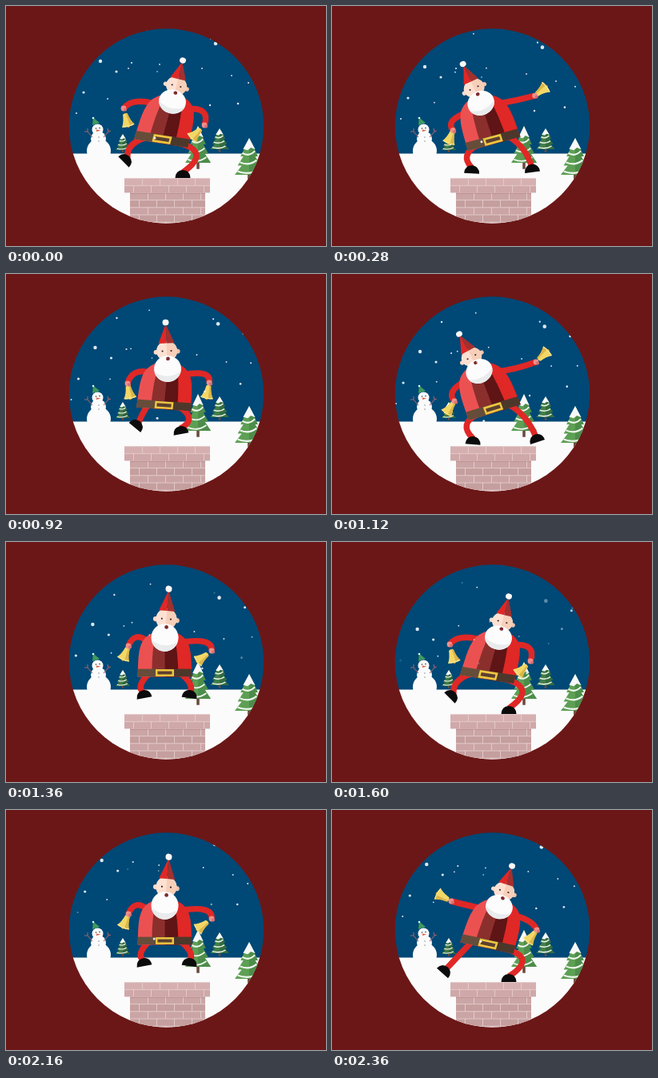
These frames come from a looping animation (400x300 px, 2.4 s). An HTML page with a canvas:

```html
<!DOCTYPE html>
<html lang="en">
<head>
<meta charset="utf-8">
<title>Dancing Santa</title>
<style>
html, body { margin: 0; width: 100%; height: 100%; overflow: hidden; background: #6b1717; }
canvas { display: block; }
</style>
</head>
<body>
<canvas id="stage" width="400" height="300"></canvas>
<script>
const ctx = document.getElementById('stage').getContext('2d');
const LOOP = 2400, STEP = 40, BEAT = 800, AXIS = 399;
const RED = '#e02826', LIGHT_RED = '#ec5152', DULL_RED = '#a3302f', PINK = '#ee8f8c';

// Arms: elbow, hand, bell. Legs: knee, sole. Tilts: body, left foot, right foot.
const settle = {
  buckle: [195, 166.5], beard: [208, 119.5], pom: [221, 68], tilts: [9, 45, 0],
  armL: [158, 114, 147, 128, 151, 143], armR: [256, 126, 248, 149, 237, 160],
  legL: [150, 172, 147, 195], legR: [258, 182, 221, 215]
};
const rise = {
  buckle: [197.5, 164], beard: [202, 118.5], pom: [199.5, 60.5], tilts: [4, 40, -10],
  armL: [157, 117, 152, 137, 154, 148], armR: [257, 119, 254, 136, 252, 148],
  legL: [169, 177, 161, 192], legR: [240, 182, 219, 200]
};
const tuck = {
  buckle: [198.5, 163.5], beard: [198.5, 119.5], pom: [203.5, 58.7], tilts: [0, -10, 8],
  armL: [161, 110, 153, 130, 149, 140], armR: [259, 119, 257, 136, 245, 145],
  legL: [162, 181, 173, 195], legR: [236, 179, 229, 195]
};
const land = {
  buckle: [201.5, 168], beard: [184, 121.5], pom: [159, 75], tilts: [-17, 5, -18],
  armL: [142, 147, 153, 159, 147, 168], armR: [228, 120, 255, 110, 264.5, 101],
  legL: [157, 187, 176, 213], legR: [243, 175, 257, 210]
};
const fling = {
  buckle: [195, 167.5], beard: [209, 121], pom: [225, 70], tilts: [12, 42, 0],
  armL: [172, 120, 149, 114, 138, 108], armR: [252, 138, 256, 150, 249, 159],
  legL: [162, 178, 138, 204], legR: [258, 184, 221, 215]
};

function mirror(p) {
  const flip = a => a.map((v, i) => i % 2 ? v : AXIS - v);
  const [body, left, right] = p.tilts;
  return {
    buckle: flip(p.buckle), beard: flip(p.beard), pom: flip(p.pom),
    tilts: [-body, -right, -left],
    armL: flip(p.armR), armR: flip(p.armL), legL: flip(p.legR), legR: flip(p.legL)
  };
}

const half = [[0, settle], [120, rise], [160, mirror(tuck)], [320, land], [360, mirror(fling)]];
const keys = half.concat(half.map(([t, p]) => [t + BEAT / 2, mirror(p)]));

function keyAt(i) {
  const n = keys.length, turn = Math.floor(i / n), [t, p] = keys[i - turn * n];
  return [t + turn * BEAT, p];
}

// Monotone cubic through four neighbouring keys.
function blend(v, t, now) {
  const slope = i => (v[i + 1] - v[i]) / (t[i + 1] - t[i]);
  const tangent = (a, b) => a * b > 0 ? 2 * a * b / (a + b) : 0;
  const h = t[2] - t[1], u = (now - t[1]) / h;
  const m1 = tangent(slope(0), slope(1)) * h, m2 = tangent(slope(1), slope(2)) * h;
  const s = u * u * (3 - 2 * u);
  return v[1] * (1 - s) + v[2] * s + m1 * u * (1 - u) * (1 - u) - m2 * u * u * (1 - u);
}

function poseAt(time) {
  const now = time % BEAT;
  let i = keys.length - 1;
  while (keys[i][0] > now) i--;
  const near = [i - 1, i, i + 1, i + 2].map(keyAt), times = near.map(k => k[0]);
  const pose = {};
  for (const part in settle) {
    pose[part] = settle[part].map((_, j) => blend(near.map(k => k[1][part][j]), times, now));
  }
  return pose;
}

function dot(x, y, r, color) {
  ctx.fillStyle = color;
  ctx.beginPath();
  ctx.arc(x, y, r, 0, 7);
  ctx.fill();
}

function rect(x, y, w, h, color) {
  ctx.fillStyle = color;
  ctx.fillRect(x, y, w, h);
}

function poly(color, ...pts) {
  ctx.fillStyle = color;
  ctx.beginPath();
  pts.forEach(([x, y]) => ctx.lineTo(x, y));
  ctx.fill();
}

function shape(color, path) {
  ctx.fillStyle = color;
  ctx.fill(new Path2D(path));
}

function line(color, width, path) {
  ctx.strokeStyle = color;
  ctx.lineWidth = width;
  ctx.stroke(new Path2D(path));
}

function within(matrix, draw) {
  ctx.save();
  ctx.transform(...matrix);
  draw();
  ctx.restore();
}

function spin(x, y, angle, draw) {
  const c = Math.cos(angle), s = Math.sin(angle);
  within([c, s, -s, c, x, y], draw);
}

function tree(x, top, base, width, green, shade) {
  const h = base - top, r = width / 2;
  rect(x - r * .11, base - 1, r * .22, h * .19, '#6b4a3c');
  for (let i = 2; i >= 0; i--) {
    const y0 = top + h * i * .24, y1 = top + h * (.5 + i * .25), w = r * (.6 + i * .2);
    poly(green, [x, y0], [x + w, y1], [x - w, y1]);
    poly(shade, [x, y0], [x + w, y1], [x, y1]);
    line('#eef5ee', Math.max(1, width / 17),
      `M${x - w * .8} ${y1 - h * .09}Q${x} ${y1 + h * .02} ${x + w * .65} ${y1 - h * .15}`);
  }
  poly('#f7f9f9', [x, top], [x + r * .42, top + h * .31], [x + r * .12, top + h * .26],
    [x - r * .1, top + h * .33], [x - r * .42, top + h * .3]);
}

function snowman() {
  dot(116, 181, 15, '#fbfbfc');
  dot(115.5, 166, 9.5, '#fbfbfc');
  dot(114.5, 154.5, 7, '#fbfbfc');
  poly('#3f9a5b', [108, 149], [117, 146], [109, 139.5]);
  dot(109, 140, 1.3, '#e8f2ea');
  line('#9a6470', 1.1, 'M108 164L102 157M102 157L98 157M102 157L102 153M122 164L128 157M128 157L131 156M128 157L127 153');
  dot(112.5, 153, .8, '#333');
  dot(117, 152.5, .8, '#333');
  poly('#e2603a', [113, 154.5], [118.5, 155.5], [113, 157]);
  for (const y of [164, 169]) dot(116, y, .8, '#8b8f98');
}

function bricks(x, y, w, rows, color) {
  const brick = 22, tall = 9.2;
  rect(x, y, w, rows * tall, color);
  for (let r = 0; r < rows; r++) {
    const top = y + r * tall;
    if (r % 2) rect(x, top, w, tall, 'rgba(150,95,95,.1)');
    for (let bx = x + (r % 2 ? brick / 2 : brick); bx < x + w; bx += brick) rect(bx, top, .9, tall, '#e6cdcd');
    rect(x, top, w, .9, '#e6cdcd');
  }
}

function scenery() {
  rect(75, 24, 250, 162, '#004876');
  rect(75, 184.5, 250, 90, '#fbfbfc');
  snowman();
  tree(146, 160, 180, 18, '#437b48', '#34673e');
  tree(267, 153, 179, 23, '#437f49', '#346c3e');
  tree(240, 150, 196, 32, '#5d9f54', '#4d8d4a');
  tree(304, 165, 211, 36, '#5d9f54', '#4d8d4a');
  bricks(155, 233, 94, 5, '#cba5a5');
  rect(155, 233, 94, 2, 'rgba(120,70,72,.18)');
  bricks(148, 215, 107, 2, '#d6b0b1');
}

// Start x, start y, radius.
const flakes = [
  [118, 69, 2.2], [262, 47, 2.3], [157, 71, 1.1], [153, 78, .9], [138, 82, 1.6], [192, 73, .9],
  [145, 32, 1.2], [256, 41, 1.1], [189, 82, .8], [294, 59, 1.5], [97, 108, 1.6], [290, 122, 1.3],
  [255, 124, 1.2], [176, 30, .9], [282, 87, .9], [303, 96, 1], [88, 134, 1], [127, 116, .9],
  [245, 78, .9], [186, 165, 1.5]
];

// Each flake drifts for one loop and fades while it returns to its start.
function snow(time) {
  flakes.forEach(([x, y, r], i) => {
    const born = .12 + (i * .37 + .1) % .3, life = (time / LOOP + born) % 1, move = life - born;
    const [drift, fall] = i % 2 ? [8, 40] : [-17, 60];
    ctx.globalAlpha = .92 * Math.min(1, life * 10, (1 - life) * 10);
    dot(x + move * drift, y + move * fall, r, '#eef6fa');
  });
  ctx.globalAlpha = 1;
}

function limb(start, cx, cy, x, y) {
  line(RED, 7.5, `M${start}Q${cx} ${cy} ${x} ${y}`);
}

function bell([, , hx, hy, bx, by]) {
  spin(bx, by, Math.atan2(by - hy, bx - hx) - Math.PI / 2, () => {
    dot(0, 7.5, 1.8, '#c99427');
    shape('#f3d766', 'M-3 -8Q0 -10.5 3 -8Q4 1 8 7Q0 9 -8 7Q-4 1 -3 -8');
    shape('#dcb648', 'M1 -9Q3 -9 3 -8Q4 1 8 7Q5 8 2 8');
    line('#fbea9c', 1.1, 'M-7.5 6.5Q0 8.5 7.5 6.5');
  });
  dot(hx, hy, 3.4, PINK);
  dot(hx + 2, hy + 1.5, 2, '#d9706f');
}

function leg(start, [kx, ky, x, y], tilt) {
  const a = tilt * Math.PI / 180;
  limb(start, kx, ky, x + 7 * Math.sin(a), y - 7 * Math.cos(a));
  spin(x, y, a, () => shape('#0c0b0c', 'M-9.5 0Q-9 -9.5 0 -10Q9 -9.5 9.5 0Z'));
}

function jacket() {
  const outline = new Path2D('M-34 5C-33 -14 -34 -28 -28 -40Q-20 -53 0 -54Q20 -53 28 -40C34 -28 33 -14 34 5Z');
  ctx.save();
  ctx.clip(outline);
  rect(-40, -60, 40, 70, LIGHT_RED);
  rect(0, -60, 40, 70, RED);
  shape('#8b2f2d', 'M-16 9Q-17 -30 -10 -56H0V9');
  shape('#5f1415', 'M17 9Q17 -30 10 -56H0V9');
  rect(-40, -5, 40, 10, '#654d3a');
  rect(0, -5, 40, 10, '#4c382b');
  ctx.restore();
  rect(-11.5, -4.5, 23, 9, '#f0c540');
  rect(-9, -2, 18, 4, '#5b4030');
}

function head() {
  dot(-13.5, -22, 3, '#fbd9c8');
  dot(13.5, -22, 3, '#f3c3aa');
  dot(0, -23, 13, '#fde1d3');
  shape('#f7cfb9', 'M0 -36A13 13 0 0 1 0 -10Z');
  poly(RED, [-10, -33], [0, -58], [0, -33]);
  poly(DULL_RED, [10, -33], [0, -58], [0, -33]);
  dot(0, -60, 4, '#f9f8f6');
  dot(0, 0, 17, '#fcfcfc');
  shape('#e9ebec', 'M-16.5 4A17 17 0 0 0 16.5 4Q0 15 -16.5 4');
  dot(-5.5, -23, 1.1, '#352527');
  dot(5.5, -23, 1.1, '#352527');
  dot(1, -13, 2.4, '#7d2a2c');
}

function santa(p) {
  const [bx, by] = p.buckle, [hx, hy] = p.beard, [px, py] = p.pom;
  const a = p.tilts[0] * Math.PI / 180, c = Math.cos(a), s = Math.sin(a);
  const frame = [c, s, (bx - hx) / 45, (by - hy) / 45, bx, by];
  const at = (x, y) => [bx + x * c + y * frame[2], by + x * s + y * frame[3]].join(' ');
  leg(at(-20, 1), p.legL, p.tilts[1]);
  leg(at(20, 1), p.legR, p.tilts[2]);
  limb(at(-20, -39), ...p.armL);
  limb(at(20, -39), ...p.armR);
  within(frame, jacket);
  bell(p.armL);
  bell(p.armR);
  const ux = (hx - px) / 60, uy = (hy - py) / 60, len = Math.hypot(ux, uy);
  within([uy / len, -ux / len, ux, uy, hx, hy], head);
}

function render() {
  const time = Math.floor(performance.now() % LOOP / STEP) * STEP;
  rect(0, 0, 400, 300, '#6b1717');
  ctx.save();
  ctx.beginPath();
  ctx.arc(200.5, 150, 121.7, 0, 7);
  ctx.clip();
  scenery();
  santa(poseAt(time));
  snow(time);
  ctx.restore();
  requestAnimationFrame(render);
}
render();
</script>
</body>
</html>
```
